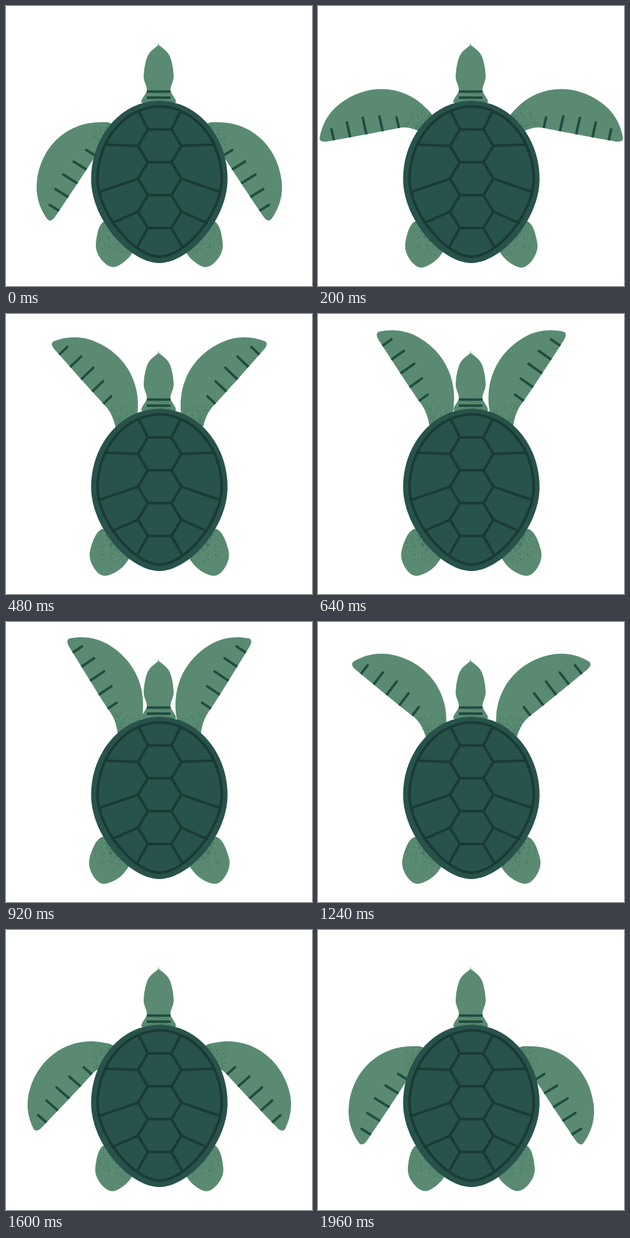
Recreate the animation shown at these times as an HTML page with a canvas. Size 480 px wide and 440 px high, loop 2000 ms.

```html
<!DOCTYPE html>
<html lang="en">
<head>
<meta charset="utf-8">
<title>Swimming turtle</title>
<style>
  html, body { margin: 0; width: 100%; height: 100%; overflow: hidden; background: #fff; }
  canvas { display: block; width: 480px; height: 440px; }
</style>
</head>
<body>
<canvas id="stage" width="480" height="440"></canvas>
<script>
const ctx = document.getElementById('stage').getContext('2d');
const LOOP = 2000, STEP = 40, TOP_TIME = 800, MAX_ANGLE = 115.5;
const SKIN = '#5a8b72', MARK = '#204d40', SPECK = '#3a6a57';
const SHELL = '#28524c', LINE = '#1a3b34';
const AXIS = 240.5, SHOULDER = [185, 197.5], HIP = [165, 320];

// Left flipper, drawn as it lies at ARM_ANGLE: a start, then cubic segments
const ARM_ANGLE = 82.7;
const arm = [[33, 96],
  [50, 80], [70, 72], [92, 72],
  [150, 72], [190, 112], [195, 160],
  [202, 190], [175, 205], [166, 185],
  [160, 172], [153, 163], [142, 158],
  [108, 142], [74, 125], [40, 108],
  [32, 104], [30, 100], [33, 96]];

// Halves measured from the axis
const shell = mirror([[0, 149], [60, 149], [107, 205], [107, 272], [107, 335], [48, 403], [0, 404]]);
const rim = mirror([[0, 158], [55, 158], [98, 212], [97.5, 274], [96, 325], [42, 393], [0, 394]]);
const head = smooth(mirror([[0, 61], [17, 78], [23.5, 110], [18.5, 132], [25, 153]]));
const rear = smooth([[155, 338], [141, 374], [150, 399], [171, 410], [198, 388], [205, 350]]);
const rimEnds = [[32, 167], [83, 218], [94, 292], [74, 341], [35, 378]];

const mix = (a, b, k) => a + (b - a) * k;
const clamp = v => Math.max(0, Math.min(1, v));

function mirror(half) {
  return half.concat(half.slice(0, half[half.length - 1][0] ? undefined : -1)
    .reverse().map(([x, y]) => [-x, y]));
}

// Cubic chain for a closed curve through a few points
function smooth(pts) {
  const n = pts.length, at = i => pts[(i + n) % n];
  const chain = [pts[0]];
  for (let i = 0; i < n; i++) {
    const a = at(i - 1), b = at(i), c = at(i + 1), d = at(i + 2);
    chain.push([b[0] + (c[0] - a[0]) / 6, b[1] + (c[1] - a[1]) / 6],
      [c[0] - (d[0] - b[0]) / 6, c[1] - (d[1] - b[1]) / 6], c);
  }
  return chain;
}

function path(chain) {
  ctx.beginPath();
  ctx.moveTo(...chain[0]);
  for (let i = 1; i + 2 < chain.length; i += 3)
    ctx.bezierCurveTo(...chain[i], ...chain[i + 1], ...chain[i + 2]);
  ctx.closePath();
}

function line(x1, y1, x2, y2) {
  ctx.beginPath();
  ctx.moveTo(x1, y1);
  ctx.lineTo(x2, y2);
  ctx.stroke();
}

function pen(color) {
  ctx.strokeStyle = color;
  ctx.lineWidth = 4;
  ctx.lineCap = ctx.lineJoin = 'round';
}

// Ease with control points (x1, 0) and (x2, 1)
function ease(x, x1, x2) {
  let a = 0, b = 1, s = 0.5;
  for (let i = 0; i < 24; i++) {
    s = (a + b) / 2;
    const q = 1 - s;
    if (3 * s * q * q * x1 + 3 * s * s * q * x2 + s * s * s < x) a = s; else b = s;
  }
  return s * s * (3 - 2 * s);
}

// Seeded specks around a centre, thinning out from radius r0 to r1
function fan(seed, count, [cx, cy], r0, r1) {
  const rnd = () => (seed = (seed * 16807) % 2147483647) / 2147483647;
  return Array.from({ length: count }, () => {
    const r = mix(r0, r1, rnd() ** 1.5), a = rnd() * 2 * Math.PI;
    return [cx + r * Math.cos(a), cy + r * Math.sin(a)];
  });
}

const armSpecks = fan(1109, 800, SHOULDER, 20, 52);
const rearSpecks = fan(2903, 700, [182, 348], 10, 42);
const neckSpecks = fan(5303, 300, [0, 160], 8, 26);

// Fills a body part and keeps what follows inside it
function skin(chain, dots) {
  path(chain);
  ctx.fillStyle = SKIN;
  ctx.fill();
  ctx.clip();
  ctx.fillStyle = SPECK;
  for (const [x, y] of dots) ctx.fillRect(x, y, 1, 1);
}

function drawArm(angle) {
  const turn = (angle - ARM_ANGLE) * Math.PI / 180;
  const c = Math.cos(turn), s = Math.sin(turn);
  const lift = clamp((angle - 83) / 30);
  // The blade slides out a little at the top; the joint stays put
  const pose = ([x, y]) => {
    const dx = x - SHOULDER[0], dy = y - SHOULDER[1];
    const slide = lift * clamp((Math.hypot(dx, dy) - 25) / 30);
    return [SHOULDER[0] + dx * c - dy * s - 10 * slide, SHOULDER[1] + dx * s + dy * c - 5 * slide];
  };
  ctx.save();
  skin(arm.map(pose), armSpecks.map(pose));
  pen(MARK);
  for (let i = 0; i < 5; i++) {
    const x = mix(49, 142, i / 4), y = mix(112, 158, i / 4);
    const len = 17 + 9 * Math.sin(Math.PI * i / 4);
    line(...pose([x, y]), ...pose([x + 0.41 * len, y - 0.91 * len]));
  }
  ctx.restore();
}

function drawRear(k) {
  ctx.save();
  ctx.translate(HIP[0], HIP[1] + 2 * k);
  ctx.rotate(0.19 * k);
  ctx.translate(-HIP[0], -HIP[1]);
  skin(rear, rearSpecks);
  ctx.restore();
}

function drawHead() {
  ctx.save();
  ctx.translate(239.5, 0);
  skin(head, neckSpecks);
  pen(MARK);
  for (const y of [134.5, 144]) line(-17, y, 17, y);
  ctx.restore();
}

function drawShell() {
  ctx.save();
  ctx.translate(AXIS, 0);
  path(shell);
  ctx.fillStyle = SHELL;
  ctx.fill();
  ctx.translate(0.5, 0);
  pen(LINE);
  path(rim);
  ctx.stroke();
  for (const side of [1, -1]) {
    ctx.scale(side, 1);
    for (let i = 0; i < 4; i++) {
      const y = 194 + 51.6 * i;
      line(0, y, 18.5, y);
      if (i === 3) continue;
      line(18.5, y, 34, y + 25.8);
      line(34, y + 25.8, 18.5, y + 51.6);
      line(34, y + 25.8, ...rimEnds[i + 1]);
    }
    line(18.5, 194, ...rimEnds[0]);
    line(18.5, 349, ...rimEnds[4]);
  }
  ctx.restore();
}

function draw(now) {
  const t = Math.floor((now % LOOP) / STEP) * STEP;
  const k = t < TOP_TIME
    ? ease(t / TOP_TIME, 0.33, 0.1)
    : 1 - ease((t - TOP_TIME) / (LOOP - TOP_TIME), 0.76, 0.15);
  ctx.fillStyle = '#fff';
  ctx.fillRect(0, 0, 480, 440);
  for (const side of [1, -1]) {
    ctx.save();
    ctx.translate(AXIS, 0);
    ctx.scale(side, 1);
    ctx.translate(-AXIS, 0);
    drawRear(k);
    drawArm(k * MAX_ANGLE);
    ctx.restore();
  }
  drawHead();
  drawShell();
}

const start = performance.now();
function tick() {
  draw(performance.now() - start);
  requestAnimationFrame(tick);
}
tick();
</script>
</body>
</html>
```
